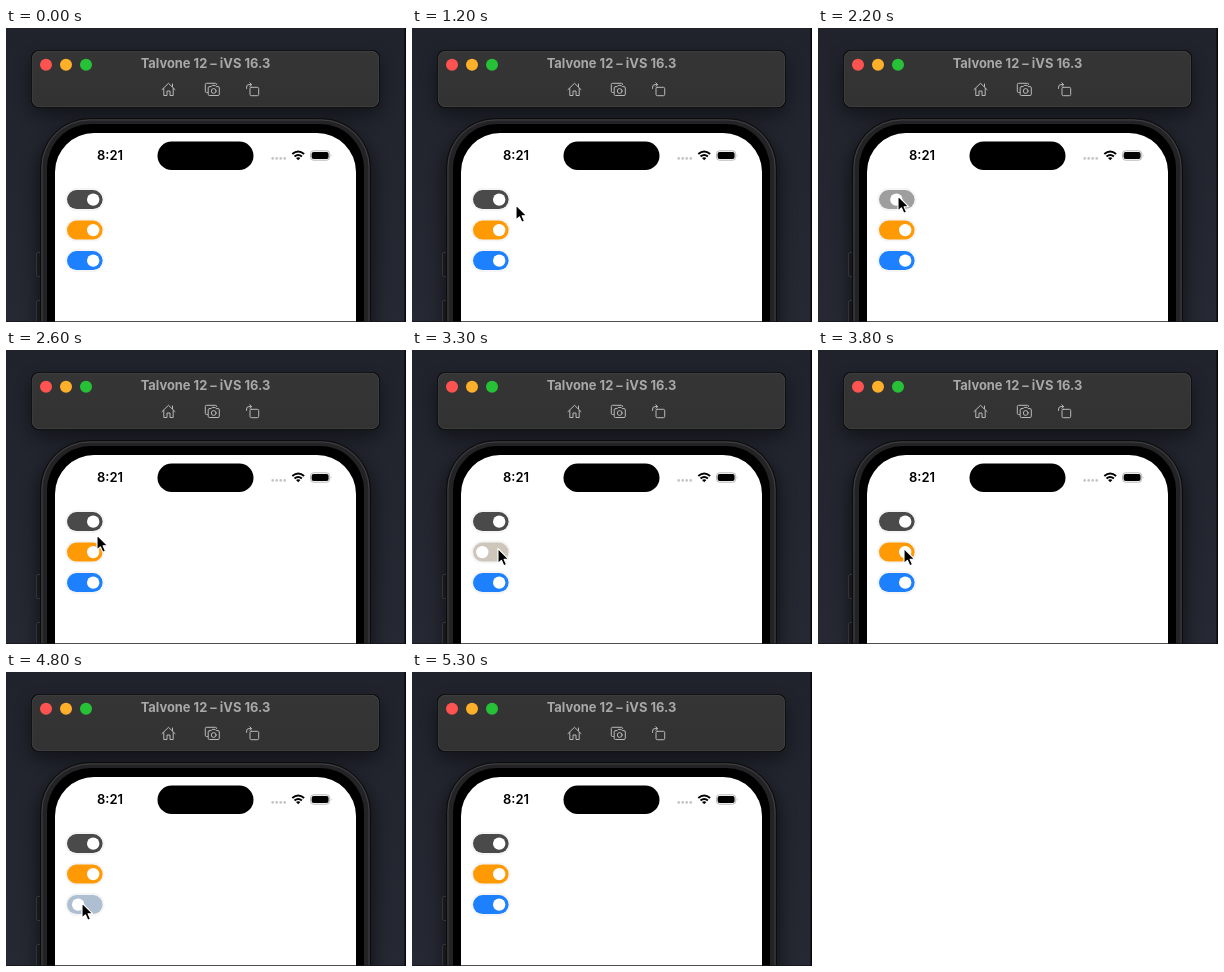
These frames come from a looping animation (400 by 294 pixels, 6100 ms). An HTML page:

```html
<!DOCTYPE html>
<html lang="en">
<head>
<meta charset="utf-8">
<title>Tinted toggles</title>
<style>
  html, body { margin: 0; width: 100%; height: 100%; overflow: hidden; background: #22252e; }
  svg { display: block; width: 400px; height: 294px; }
  text { font-family: Inter, "Liberation Sans", sans-serif; }
</style>
</head>
<body>
<svg viewBox="0 0 400 294">
  <defs>
    <linearGradient id="desk" x2="0" y2="1">
      <stop offset="0" stop-color="#20232c"/>
      <stop offset="1" stop-color="#262933"/>
    </linearGradient>
    <linearGradient id="bar" x2="0" y2="1">
      <stop offset="0" stop-color="#363535"/>
      <stop offset="1" stop-color="#323232"/>
    </linearGradient>
    <filter id="blur" x="-20%" y="-60%" width="140%" height="220%">
      <feGaussianBlur stdDeviation="9"/>
    </filter>
  </defs>

  <rect width="400" height="294" fill="url(#desk)"/>
  <rect x="25" y="30" width="349" height="57" rx="8" fill="#000" opacity=".45" filter="url(#blur)"/>
  <rect x="32" y="98" width="335" height="300" rx="50" fill="#000" opacity=".55" filter="url(#blur)"/>

  <!-- phone -->
  <g fill="#17181b" stroke="#3a3b3f" stroke-width=".8">
    <rect x="30.5" y="224.5" width="6" height="24" rx="1.5"/>
    <rect x="30.5" y="272.5" width="6" height="30" rx="1.5"/>
  </g>
  <rect x="34.5" y="90.5" width="330" height="260" rx="49" fill="#232325" stroke="#0c0c0e"/>
  <rect x="36" y="92" width="327" height="260" rx="47.5" fill="none" stroke="#414144"/>
  <rect x="41" y="96" width="317" height="260" rx="44" fill="#000"/>
  <rect x="49" y="105" width="301" height="250" rx="39" fill="#fff"/>
  <rect x="151.5" y="113.5" width="96" height="28.5" rx="14.25"/>
  <text x="104" y="132" font-size="13" font-weight="600" text-anchor="middle">8:21</text>
  <g fill="#c4c4c6">
    <circle cx="266.7" cy="130.4" r="1.3"/><circle cx="270.7" cy="130.4" r="1.3"/>
    <circle cx="274.7" cy="130.4" r="1.3"/><circle cx="278.7" cy="130.4" r="1.3"/>
  </g>
  <g fill="none" stroke="#000" stroke-width="2">
    <path d="M286.3 126Q292.2 121 298.1 126"/>
    <path d="M288.5 128.5Q292.2 125.4 295.9 128.5"/>
  </g>
  <path d="M290 130Q292.2 128.3 294.4 130L292.2 132.2Z"/>
  <rect x="304.5" y="122.8" width="19.2" height="9.4" rx="3" fill="none" stroke="#b8b8b8"/>
  <rect x="305.6" y="123.9" width="17" height="7.2" rx="2"/>
  <path d="M324.9 126v3q1.3-1.5 0-3" fill="#b8b8b8"/>

  <!-- simulator toolbar -->
  <rect x="25" y="22" width="349" height="58" rx="8" fill="#08090b"/>
  <rect x="26.3" y="23.3" width="346.4" height="55.4" rx="6.8" fill="url(#bar)" stroke="#484848" stroke-width=".8"/>
  <circle cx="40" cy="36.7" r="6" fill="#fe5350"/>
  <circle cx="60" cy="36.7" r="6" fill="#ffb02a"/>
  <circle cx="80" cy="36.7" r="6" fill="#27c138"/>
  <text x="199.5" y="40.4" font-size="12.9" font-weight="700" fill="#a8a8a8" text-anchor="middle">Talvone 12 – iVS 16.3</text>
  <g fill="none" stroke="#b9b9b9" stroke-linejoin="round" stroke-linecap="round">
    <path d="M156 61.6L162.5 55.3L169 61.6M157.8 60.5V67.5H161V63H164V67.5H167.2V60.5M166.5 58.6V56"/>
    <path d="M201.5 64.5H200.5Q199.3 64.5 199.3 63.3V56.5Q199.3 55.3 200.5 55.3H209.5Q210.7 55.3 210.7 56.5"/>
    <path d="M203.4 58.6H205.2L206.2 57.4H209.2L210.2 58.6H212Q213.3 58.6 213.3 59.8V66.3Q213.3 67.5 212 67.5H203.4Q202.2 67.5 202.2 66.3V59.8Q202.2 58.6 203.4 58.6Z"/>
    <circle cx="207.7" cy="63" r="2.4"/>
    <rect x="244" y="59.3" width="8.7" height="8.4" rx="1.3"/>
    <path d="M240.6 60.5V59Q240.6 56.6 243 56.6H245.4M243.8 54.8L245.7 56.6L243.8 58.4"/>
  </g>

  <g id="toggles"></g>
  <path id="cursor" d="M0 0V15L3.4 11.8L5.8 17.3L8.5 16.1L6.1 10.8H10.8Z" fill="#000" stroke="#fff" stroke-width="1.1" stroke-linejoin="round"/>
  <rect y="293" width="400" height="1" fill="#15161a" opacity=".75"/>
  <rect x="398.5" width="1.5" height="294" fill="#07080a"/>
</svg>
<script>
const LOOP = 6100, STEP = 100, SLIDE = 300;
const SHOW = 700, HIDE = 5300;

const toggles = [
  { y: 171.6, on: [74, 74, 74], off: [203, 203, 203], offAt: 1570, onAt: 2080 },
  { y: 202.1, on: [255, 154, 5], off: [206, 197, 187], offAt: 3000, onAt: 3450 },
  { y: 232.6, on: [28, 128, 255], off: [187, 196, 206], offAt: 4200, onAt: 4750 }
];

// Cursor stops: time, x, y
const stops = [
  [700, 326, 277], [900, 210, 222], [1100, 118, 182], [1200, 104, 177],
  [1300, 91, 174], [1500, 80, 168], [2300, 80, 168], [2600, 91, 185],
  [2700, 89, 193], [2900, 86, 198.5], [3800, 86, 198.5], [4100, 76, 231],
  [4900, 76, 231], [5200, 52, 246]
];

const cursor = document.getElementById('cursor');
const clamp = v => Math.min(1, Math.max(0, v));
const smooth = v => v * v * (3 - 2 * v);
const ramp = (t, start) => smooth(clamp((t - start) / SLIDE));
const mix = (a, b, k) => a + (b - a) * k;

function add(parent, tag, attrs) {
  const el = document.createElementNS('http://www.w3.org/2000/svg', tag);
  for (const name in attrs) el.setAttribute(name, attrs[name]);
  return parent.appendChild(el);
}

for (const toggle of toggles) {
  const group = document.getElementById('toggles');
  const track = { x: 61, y: toggle.y - 9.5, width: 35.6, height: 19, rx: 9.5 };
  add(group, 'rect', { ...track, fill: 'none', stroke: '#000', 'stroke-width': 4, opacity: .04 });
  toggle.track = add(group, 'rect', track);
  toggle.knob = add(group, 'circle', { cy: toggle.y, r: 6.2, fill: '#fff' });
}

function cursorAt(t) {
  const next = stops.findIndex(stop => stop[0] > t);
  if (next < 1) return stops[next < 0 ? stops.length - 1 : 0].slice(1);
  const [t0, x0, y0] = stops[next - 1], [t1, x1, y1] = stops[next];
  const k = (t - t0) / (t1 - t0);
  return [mix(x0, x1, k), mix(y0, y1, k)];
}

function draw(t) {
  for (const { track, knob, on, off, offAt, onAt } of toggles) {
    const k = ramp(t, offAt) - ramp(t, onAt);
    track.setAttribute('fill', `rgb(${on.map((c, i) => Math.round(mix(c, off[i], k)))})`);
    // The knob trails the tint.
    knob.setAttribute('cx', mix(87.2, 70.3, k ** 1.5));
  }
  cursor.setAttribute('visibility', t >= SHOW && t < HIDE ? 'visible' : 'hidden');
  cursor.setAttribute('transform', `translate(${cursorAt(t)})`);
}

const begin = performance.now();
function tick() {
  const t = (performance.now() - begin) % LOOP;
  draw(Math.floor(t / STEP) * STEP);
  requestAnimationFrame(tick);
}
tick();
</script>
</body>
</html>
```
